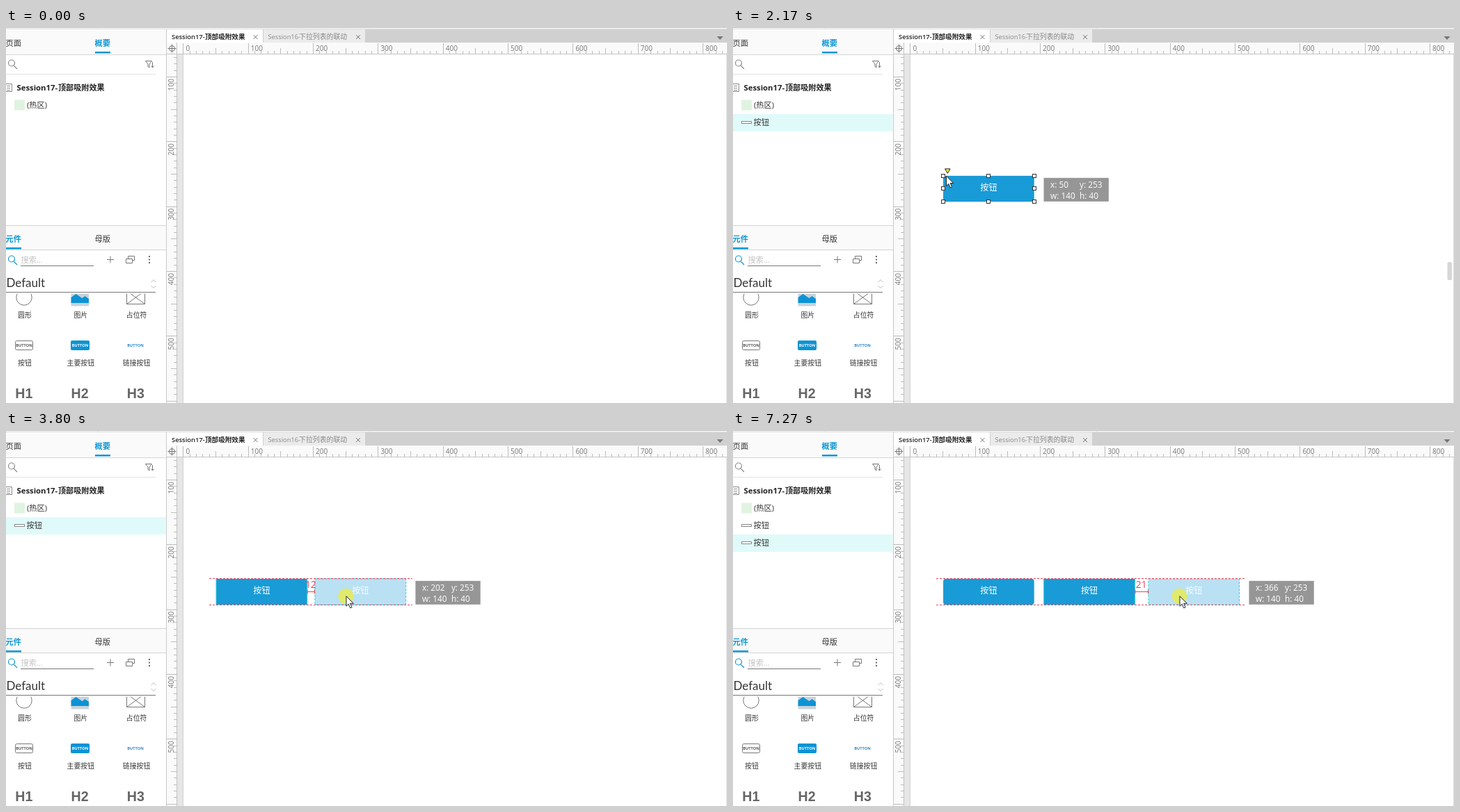
An HTML page for the animation above (8000 ms loop, 1036 px wide and 540 px high).

```html
<!DOCTYPE html>
<html lang="zh-CN">
<head>
<meta charset="utf-8">
<title>拖放按钮</title>
<style>
html, body { margin: 0; width: 100%; height: 100%; overflow: hidden; background: #fff; }
svg { display: block; }
text { font-family: "Open Sans", "Noto Sans CJK SC", "Noto Sans CJK", sans-serif; white-space: pre; }
</style>
</head>
<body>
<svg id="stage" width="1036" height="540" viewBox="0 0 1036 540">
  <defs><clipPath id="page"><rect x="246" y="38" width="789" height="502"/></clipPath>
  <clipPath id="shelf"><rect y="382.5" width="229" height="160"/></clipPath></defs>
  <g id="ui"></g><g id="live"></g>
</svg>
<script>
const LOOP = 8000, SCALE = 14 / 15, W = 140 * SCALE, H = 40 * SCALE;
const BLUE = '#189bd6', RED = '#f0405a', CYAN = '#2ccbd6';
const X = u => 255.4 + u * SCALE, Y = u => -23.3 + u * SCALE;

// Markup helpers
const rect = (x, y, w, h, fill, more = '') => `<rect x="${x}" y="${y}" width="${w}" height="${h}" fill="${fill}" ${more}/>`;
const path = (d, stroke, more = '') => `<path d="${d}" fill="none" stroke="${stroke}" ${more}/>`;
const shape = (d, fill, more = '') => `<path d="${d}" fill="${fill}" ${more}/>`;
const text = (x, y, size, s, fill = '#333', more = '') => `<text x="${x}" y="${y}" font-size="${size}" fill="${fill}" ${more}>${s}</text>`;
const MID = 'text-anchor="middle"', BOLD = 'font-weight="700"', SEMI = 'font-weight="600"';

function lens(x, y, color) {
  return path(`M${x + 3} ${y + 3}l4.5 4.5M${x + 4} ${y - 1}a4.5 4.5 0 1 1-9 0a4.5 4.5 0 1 1 9 0`, color, 'stroke-width="1.2"');
}

function rulers() {
  let top = '', side = '', labels = '';
  const len = n => n % 100 ? (n % 50 ? 4 : 8) : 15;
  for (let n = 0; n <= 830; n += 10) {
    top += `M${Math.round(X(n)) - .5} 37v${-len(n)}`;
    if (n % 100 === 0) labels += text(X(n) + 3, 33, 10, n, '#777');
  }
  for (let n = 70; n <= 600; n += 10) {
    side += `M245 ${Math.round(Y(n)) + .5}h${-len(n)}`;
    if (n % 100 === 0 && n < 600) labels += text(0, 0, 10, n, '#777', `text-anchor="end" transform="translate(241 ${Y(n) + 3}) rotate(-90)"`);
  }
  return rect(231, 21, 805, 16, '#fafafa') + rect(231, 37, 14, 503, '#fafafa') +
    rect(246, 38, 8, 502, '#e6e6e6') + path('M254.5 37V540', '#d2d2d2') +
    path(top + side, '#bcbcbc') + path('M231 37.5H1036M245.5 21V540', '#c4c4c4') + labels +
    path('M234.5 29.5a4 4 0 1 0 8 0a4 4 0 1 0-8 0M232.5 29.5h12M238.5 23.5v12', '#777');
}

function tabs() {
  const cross = (x, y) => path(`M${x - 3} ${y - 3}l6 6m0-6l-6 6`, '#777');
  return rect(0, 0, 1036, 2, '#f7f7f7') + path('M0 1.5H1036M132.5 0V2M522.5 0V2', '#dedede') +
    rect(231, 2, 805, 19, '#d0d0d0') + rect(231, 2, 138, 19, '#fff') + rect(369, 2, 147, 19, '#ebebeb') +
    path('M369.5 2V21', '#d0d0d0') +
    text(238, 15.5, 9.4, 'Session17-', '#222', SEMI) + text(286, 15.5, 9.6, '顶部吸附效果', '#222', SEMI) +
    text(376.5, 15.5, 9.3, 'Session16-', '#888') + text(421, 15.5, 9.9, '下拉列表的联动', '#888') +
    cross(358.5, 13) + cross(506, 13) + shape('M1021.5 12h9l-4.5 5z', '#777') +
    path('M1035.5 21V540', '#ddd');
}

function outline() {
  return rect(0, 3, 229, 35, '#fafafa') + path('M0 38.5H230M0 284.5H230', '#d4d4d4') +
    path('M0 66.5H215', '#e2e2e2') + path('M230.5 2V540', '#c8c8c8') +
    text(-.5, 26, 11.2, '页面') + text(127.5, 26, 11.2, '概要', '#0d96d4', BOLD) + rect(128, 34, 22, 2.5, '#0d96d4') +
    lens(8.5, 51.5, '#888') +
    path('M200.5 47.5h9l-3.5 4.5v5l-2-1.5v-3.5zM210.5 49v8m-2-2.5l2 2.5l2-2.5', '#777') +
    path('M-.5 80.5h9v11h-9zM1 83.5h5M1 86.5h5M1 89.5h5', '#888') +
    text(15.5, 90, 11.3, 'Session17-', '#222', BOLD) + text(75, 90, 11.1, '顶部吸附效果', '#222', BOLD) +
    rect(12, 103.5, 15, 15, '#e0f3e0') + text(30, 115, 11.2, '(热区)');
}

function library() {
  const tag = (x, fill) => text(x, 459, 5.6, 'BUTTON', fill, `${MID} ${BOLD}`);
  const names = [['圆形', '图片', '占位符'], ['按钮', '主要按钮', '链接按钮']];
  let out = rect(0, 285, 229, 34, '#fafafa') + path('M0 319.5H230', '#d4d4d4') +
    text(-.5, 308, 11.2, '元件', '#0d96d4', BOLD) + rect(0, 316, 22, 2.5, '#0d96d4') + text(127.5, 308, 11.2, '母版') +
    lens(8.5, 333.5, '#0d96d4') + text(21.5, 338, 11.2, '搜索...', '#c4c4c4') + path('M21 342.5H126', '#777') +
    path('M145 333.5h10M150 328.5v10M172.5 332.5h9v6h-9zM175.5 332v-3.5h9v6h-3', '#777') +
    [329, 333.5, 338].map(y => rect(205, y - 1, 2, 2, '#666')).join('') +
    text(.5, 373, 17, 'Default', '#333', 'style="font-family:Lato,sans-serif"') +
    path('M208.5 366l3.5-3.5l3.5 3.5M208.5 371l3.5 3.5l3.5-3.5', '#bbb') + path('M0 380.5H215', '#777');
  out += `<g clip-path="url(#shelf)"><circle cx="26" cy="388" r="11.2" fill="none" stroke="#777"/>` +
    rect(93.5, 374, 25.5, 26.5, '#c9d3da') + shape('M93.5 388l7-5l9 6l4-3l5.5 4v6h-25.5z', '#0d93d4') +
    path('M173.5 378.5h26v19h-26zl26 19m0-19l-26 19', '#777') + '</g>';
  names.forEach((row, r) => row.forEach((s, i) => out += text(27 + i * 80.3, 417 + r * 69, 9.9, s, '#333', MID)));
  out += rect(13.5, 450.5, 25, 13, '#fff', 'rx="2" stroke="#777"') + tag(26, '#555') +
    rect(93, 450, 27, 14, '#0d93d4', 'rx="2"') + tag(106.5, '#fff') + tag(186, '#2f86c6');
  for (const i of [1, 2, 3]) out += text(-54.5 + i * 80.3, 533, 19.6, 'H' + i, '#666', `${MID} ${BOLD} style="font-family:'Liberation Sans',sans-serif"`);
  return out;
}

// Timeline: each run spreads its points evenly from t0 to t1
const steps = [{ t: 0 }];
function run(t0, t1, points, base, make) {
  points.forEach((p, i) => steps.push({
    t: points.length > 1 ? t0 + Math.round((t1 - t0) * i / (points.length - 1)) : t0, ...base, ...make(p, i)
  }));
}
const move = (t0, t1, points, base) => run(t0, t1, points, base, p => ({ at: p }));
const drag = (t0, t1, points, base) => run(t0, t1, points, { press: true, ...base }, ([x, y]) => {
  const nudge = x === base.from + 70 ? 4 : 0;
  return { ghost: [x, y], at: [X(x) + 45 + nudge, Y(y) + (y === 253 ? 25 : 22.5) + nudge * .75] };
});
const one = [50], two = [50, 205];

run(140, 670, [...Array(8).keys()], {}, i => {
  const k = 1 - (1 - i / 7) ** 2;
  return { at: [430 - 324 * k, 530 - 72 * k], bar: i < 7, tile: i > 5 };
});
move(900, 900, [[106, 458]], { press: true, tile: true });
run(980, 1620, [[132, 438], [182, 388], [240, 318], [290, 262], [322, 238], [315, 232], [306.5, 229], [306.5, 222], [306.5, 216]],
  { press: true, fresh: true }, ([x, y], i) => ({
    at: [x, y], ghost: [i > 5 ? 50 : Math.round((x - 260.4) / SCALE), Math.round((y + 23) / SCALE)]
  }));
move(1770, 1770, [[306.5, 213]], { press: true, fresh: true, ghost: [50, 253] });
move(2170, 2250, [[306.5, 213], [306.5, 213]], { placed: one, pick: true, bar: true, note: [50, 253] });
move(2390, 2560, [[314, 218], [332, 228], [347.5, 235.5]], { placed: one, pick: true, bar: true, grip: true });
move(2790, 2790, [[347.5, 235.5]], { placed: one, pick: true, bar: true, grip: true, press: true });
drag(2940, 3340, [[50, 253], [64, 256], [88, 260], [115, 264], [136, 267], [148, 268]], { placed: one, from: 50 });
drag(3570, 3800, [[165, 265], [180, 260], [190, 253], [202, 253]], { placed: one, from: 50 });
drag(5340, 5590, [[203, 253], [205, 253]], { placed: one, from: 50 });
move(5820, 5820, [[492, 238]], { placed: two, pick: true, bar: true, grip: true, note: [205, 253] });
drag(6120, 6440, [[205, 253], [212, 253], [228, 253], [250, 253], [275, 253]], { placed: two, from: 205 });
drag(6520, 6810, [[292, 253], [318, 257], [340, 259], [357, 261], [366, 261]], { placed: two, from: 205 });
drag(6960, 6960, [[370, 261]], { placed: two, from: 205 });
drag(7110, 7270, [[371, 253], [369, 253], [366, 253]], { placed: two, from: 205 });

function button(u, s) {
  const x = X(u), y = Y(253), last = u === s.placed[s.placed.length - 1];
  let out = rect(x, y, W, H, BLUE, last ? '' : 'rx="4"') + text(x + W / 2, y + 21.5, 12.1, '按钮', '#fff', MID);
  if (last && s.ghost) out += path(`M${x} ${y}v${H}M${x + W} ${y}v${H}`, CYAN);
  if (last && s.pick) {
    for (const i of [0, .5, 1]) for (const j of [0, .5, 1]) if (i !== .5 || j !== .5)
      out += rect(Math.round(x + W * i) - 2.5, Math.round(y + H * j) - 2.5, 5, 5, '#fff', 'stroke="#333"');
    out += shape(`M${x + 2.5} ${y - 10}h7.5l-3.75 6.5z`, '#ffe93b', 'stroke="#222"');
  }
  return out;
}

function note([u, v]) {
  const x = X(u) + W + 13.8, y = Y(v) + 3, t = (dx, dy, s) => text(x + dx, y + dy, 11.8, s, '#fff');
  return rect(x, y, 93.3, 34, '#969696') + t(9.5, 14.3, 'x: ' + u) + t(51.5, 14.3, 'y: ' + v) +
    t(9.5, 30, 'w: 140') + t(51.5, 30, 'h: 40');
}

function span(a, b, label) {
  const y = 231.5;
  return path(`M${a} ${y}H${b}M${a + .5} ${y - 3}v6M${b - .5} ${y - 3}v6`, RED) +
    text((a + b) / 2 - .5, 226, 13.8, label, RED, MID);
}

function guides(s) {
  const [u, v] = s.ghost, x = X(u), y = Y(v), dash = 'stroke-dasharray="3 2"';
  if (s.fresh) {
    if (u !== 50) return '';
    return path(`M${x} ${y - 10}V540`, RED, dash) + path(`M325.5 ${y + H}V540M322 ${y + H + .5}h7`, RED);
  }
  if (v !== 253) return '';
  const gap = u - s.from, left = X(s.from);
  let out = path(`M292 212.5H${x + W + 9.3}M292 250.5H${x + W + 9.3}`, RED, dash);
  if (gap === 70 || gap === 140) out += path(`M${x} 203V260`, RED, dash);
  if (gap > 140) out += span(left + W, x, gap - 140);
  else if (gap > 0 && gap < 140) out += span(left, x, gap) + span(left + W, x + W, gap);
  return out;
}

function ghost(s) {
  const x = X(s.ghost[0]), y = Y(s.ghost[1]);
  return rect(x, y, W, H, BLUE, 'fill-opacity=".3"') + path(`M${x} ${y}h${W}v${H}h${-W}z`, CYAN, 'stroke-dasharray="3 2"') +
    text(x + W / 2, y + 21.5, 12.1, '按钮', '#fff', MID + ' opacity=".85"') + guides(s) + note(s.ghost);
}

function pointer(s) {
  const [x, y] = s.at;
  const halo = s.press ? `<circle cx="${x - .5}" cy="${y}" r="11" fill="#fff000" fill-opacity=".56"/>` : '';
  const icon = s.grip
    ? shape('M0-10 4-6H1.5V-1.5H6V-4L10 0 6 4V1.5H1.5V6H4L0 10-4 6H-1.5V1.5H-6V4L-10 0-6-4V-1.5H-1.5V-6H-4Z', s.press ? '#f6f3a0' : '#fff', 'stroke="#444"')
    : shape('M0 0V14.5l3.3-3.1 2.4 5.6 2.4-1-2.4-5.5H10.3Z', '#fff', 'stroke="#222"');
  return halo + `<g transform="translate(${x} ${y})">${icon}</g>`;
}

function draw(s) {
  const placed = s.placed || [];
  let out = s.tile ? rect(68, 436, 78, 56, '#000', 'fill-opacity=".04"') : '';
  placed.forEach((u, i) => {
    const y = 124 + i * 25;
    if (i === placed.length - 1) out += rect(0, y, 229.5, 25, '#e0fafa');
    out += rect(12.5, y + 10.5, 14, 3, '#fff', 'stroke="#888"') + text(29.5, y + 16, 11.2, '按钮');
  });
  out += '<g clip-path="url(#page)">' + placed.map(u => button(u, s)).join('') +
    (s.ghost ? ghost(s) : '') + (s.note ? note(s.note) : '') + '</g>';
  if (s.bar) out += rect(1026.5, 337, 6.5, 26, '#d6d6d6', 'rx="2"');
  return out + (s.at ? pointer(s) : '');
}

const live = document.getElementById('live');
document.getElementById('ui').innerHTML = tabs() + rulers() + outline() + library();
const start = performance.now();
let shown;
function tick() {
  const t = (performance.now() - start) % LOOP;
  const s = steps.findLast(k => k.t <= t);
  if (s !== shown) live.innerHTML = draw(shown = s);
  requestAnimationFrame(tick);
}
tick();
</script>
</body>
</html>
```
